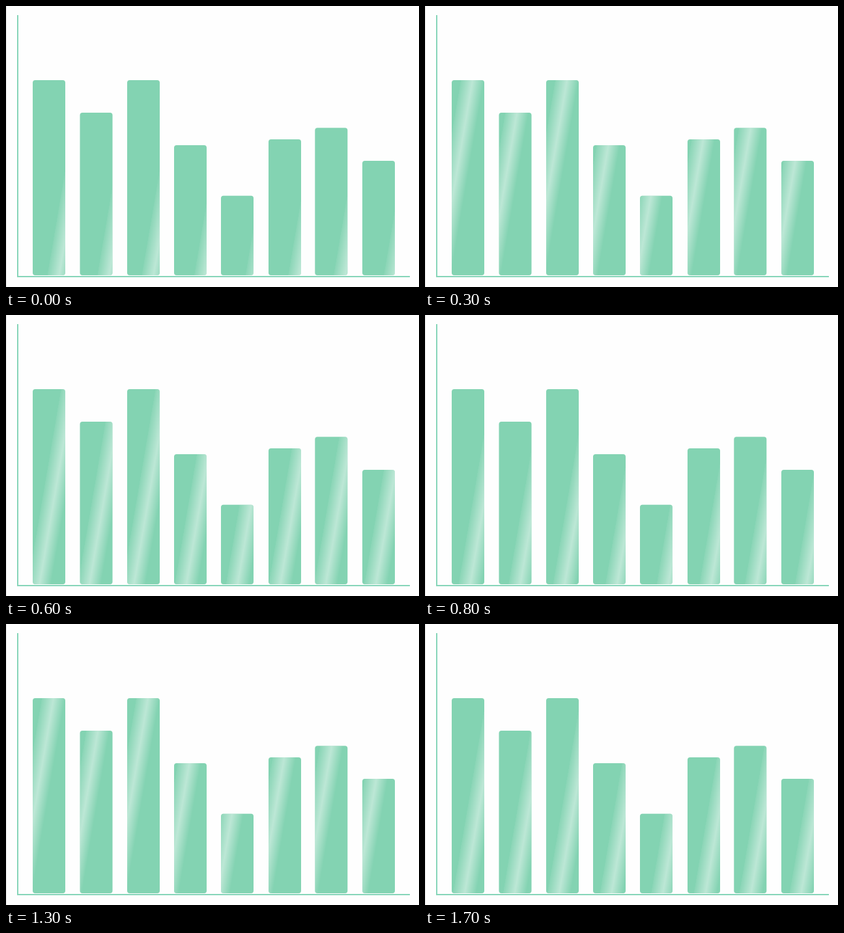
A matplotlib script for the animation above (1800 ms loop, 634 by 432 pixels).

```python
import numpy as np
import matplotlib.pyplot as plt
from matplotlib.animation import FuncAnimation
from matplotlib.patches import FancyBboxPatch, PathPatch, Rectangle
from matplotlib.path import Path

W, H, DPI = 634, 432, 64
FRAMES, STEP_MS = 18, 100
SWEEP_STEPS = 10

GREEN = "#83d3b2"
AXIS = "#86d5b9"
LEFTS = np.array([41, 113.5, 186, 258, 330, 403, 474.3, 547])
TOPS = np.array([114, 164, 114, 214, 291.7, 205, 187.3, 238])
BAR_W, BASE = 50, 414
SLANT = 0.17         # sideways shift of the sheen per pixel of height
HALF, PEAK = 18, 0.47

fig = plt.figure(figsize=(W / DPI, H / DPI), dpi=DPI, facecolor="#fefefe")
ax = fig.add_axes([0, 0, 1, 1])
ax.axis("off")


def rect(x, y, w, h, color):
    ax.add_patch(Rectangle((x, y), w, h, fc=color, ec="none"))


def bar_path(left, top):
    box = FancyBboxPatch((left, top), BAR_W, BASE - top,
                         boxstyle="round,pad=0,rounding_size=4")
    return box.get_path()


rect(0, 0, 1, H, "#e6e6e6")
rect(17, 14, 1.5, 402.5, AXIS)
rect(17, 414.9, 602.5, 1.6, AXIS)

bars = Path.make_compound_path(*[bar_path(*b) for b in zip(LEFTS, TOPS)])
ax.add_patch(PathPatch(bars, fc=GREEN, ec="none"))

# Distance of each pixel from a slanted line through its bar's left mid point
ys, xs = np.mgrid[:H, :W] + 0.5
owner = np.clip(np.searchsorted(LEFTS - 5, xs) - 1, 0, len(LEFTS) - 1)
middle = (TOPS[owner] + BASE) / 2
across = xs - LEFTS[owner] + SLANT * (ys - middle)

layer = np.ones((H, W, 4))
layer[..., 3] = 0
sheen = ax.imshow(layer, extent=(0, W, H, 0), interpolation="nearest",
                  aspect="auto", zorder=3)
sheen.set_clip_path(bars, ax.transData)
ax.set_xlim(0, W)
ax.set_ylim(H, 0)


def sweep(frame):
    """Sheen centre relative to a bar's left edge, slowing at both ends."""
    phase = ((frame - 1) % SWEEP_STEPS + 1) / SWEEP_STEPS
    u = 2 * phase - 1
    return 26 + 50.4 * u - 10.4 * u ** 3


def update(frame):
    dist = across - sweep(frame)
    glow = np.clip(1 - np.abs(dist) / HALF, 0, 1)
    edge = 0.06 * ((dist > -HALF) & (dist < 0)) * (1 - glow)
    layer[..., 3] = PEAK * glow + edge
    sheen.set_data(layer)
    return [sheen]


anim = FuncAnimation(fig, update, frames=FRAMES, interval=STEP_MS,
                     repeat=True, repeat_delay=0, blit=False)
plt.show()
```
